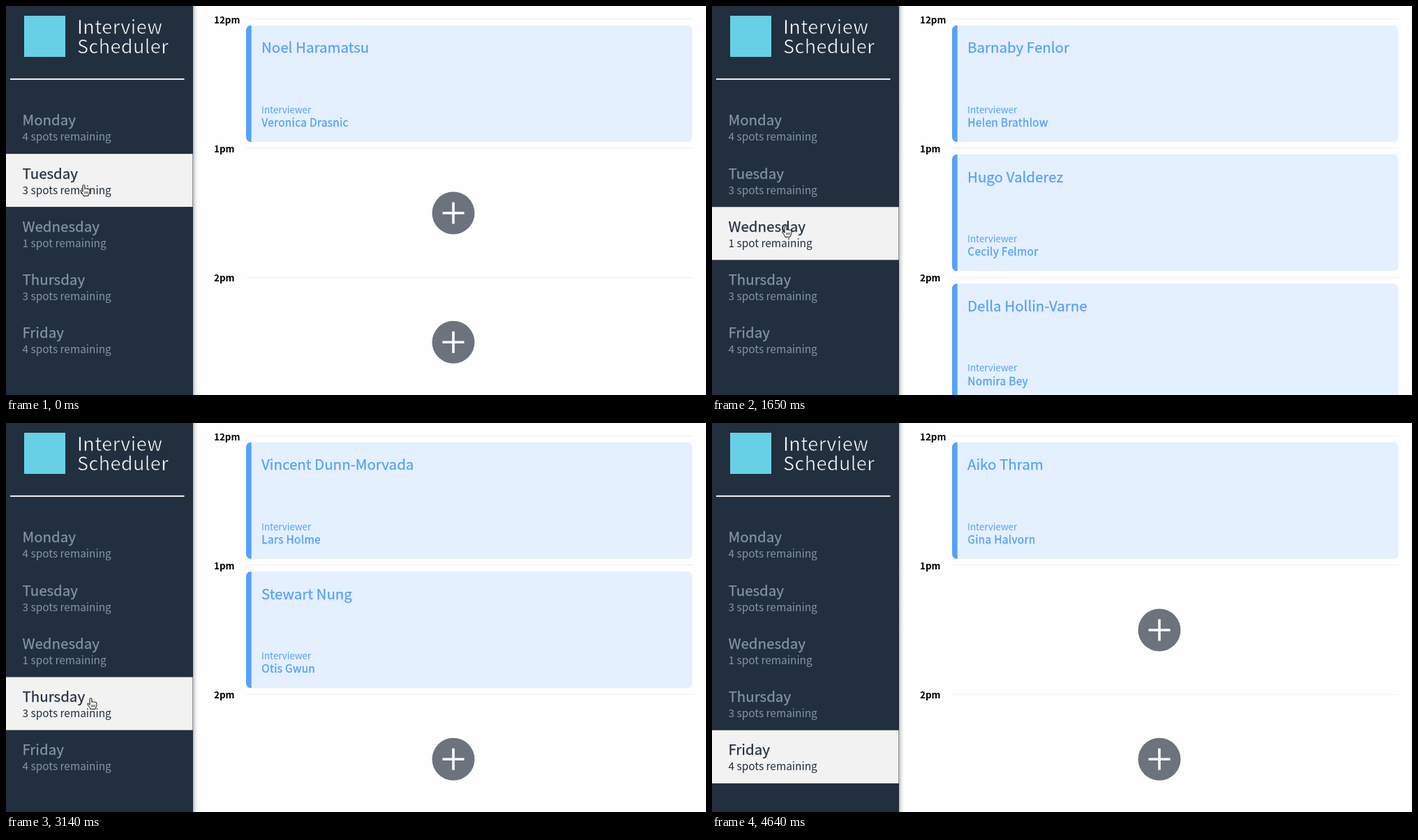
Write an HTML page that moves like this. It is 1003 by 558 pixels and loops after 5990 ms.

```html
<!DOCTYPE html>
<html lang="en">
<head>
<meta charset="utf-8">
<title>Interview Scheduler</title>
<style>
  html, body { margin: 0; width: 100%; height: 100%; overflow: hidden; background: #fefefe; }
  svg { display: block; width: 100vw; height: 100vh; }
  text { font-family: "Noto Sans CJK JP", "Noto Sans CJK SC", "Noto Sans CJK KR", "Noto Sans CJK TC", "Noto Sans", sans-serif; white-space: pre; }
  .brand { font-size: 27px; letter-spacing: .4px; fill: #fff; stroke: #222f3e; stroke-width: .6; }
  .day { font-size: 20.5px; stroke-width: .25; }
  .spots { font-size: 15.4px; }
  .hour { font-size: 13.4px; font-weight: 700; fill: #000; }
  .guest { font-size: 20.5px; fill: #54a0ff; stroke: #54a0ff; stroke-width: .25; }
  .label { font-size: 13.35px; fill: #54a0ff; }
  .host { font-size: 15.4px; letter-spacing: .33px; fill: #54a0ff; stroke: #54a0ff; stroke-width: .35; }
</style>
</head>
<body>
<svg viewBox="0 0 1003 558" preserveAspectRatio="none">
  <defs>
    <linearGradient id="shade">
      <stop offset="0" stop-color="#000" stop-opacity=".26"/>
      <stop offset=".45" stop-color="#000" stop-opacity=".09"/>
      <stop offset="1" stop-color="#000" stop-opacity="0"/>
    </linearGradient>
    <g id="hand" stroke="#000" stroke-linejoin="round" stroke-linecap="round">
      <path fill="#fff" d="M4 10V1.9C4.2.3 6.7.3 6.9 1.9V6.4C7.2 5.3 9 5.3 9.4 6.7C9.8 5.5 11.6 5.7 11.9 7.1C12.3 6.1 13.9 6.3 13.9 7.7V10.5C13.9 13 12.1 14.6 11.9 16.4H4.9C4.7 15 4.3 14.3 3.6 13.4L.9 9.7C.2 8.6 1.2 7.6 2.2 8.4Z"/>
      <path fill="none" stroke-width=".8" d="M6.9 10.4V13.2M9 10.4V13.2M11.1 10.4V13.2"/>
    </g>
    <path id="arrow" fill="#000" stroke="#fff" d="M.5.8V14L3.6 11.1L5.7 16.2L7.9 15.3L5.8 10.4H10.2Z"/>
  </defs>
  <rect width="1003" height="558" fill="#fefefe"/>
  <g id="schedule"></g>
  <rect x="268" width="7" height="558" fill="url(#shade)"/>
  <rect width="268" height="558" fill="#222f3e"/>
  <rect x="26" y="14" width="59" height="59" fill="#67d0e6"/>
  <text class="brand" x="102" y="40">Interview</text>
  <text class="brand" x="102" y="67.6">Scheduler</text>
  <rect x="6" y="103.9" width="249.5" height="1.9" fill="#fff"/>
  <g id="days"></g>
  <use id="cursor"/>
</svg>
<script>
const LOOP = 5990;
const ROW_TOP = 135.9, ROW = 76.2, SLOT = 185.25;
const DARK = '#222f3e', LIGHT = '#f2f2f2', RED = '#ee5253', GREY = '#8395a7';

const days = [
  { name: 'Monday', spots: 4 },
  { name: 'Tuesday', spots: 3, slots: [['Noel Haramatsu', 'Veronica Drasnic']] },
  { name: 'Wednesday', spots: 1, slots: [
    ['Barnaby Fenlor', 'Helen Brathlow'],
    ['Hugo Valderez', 'Cecily Felmor'],
    ['Della Hollin-Varne', 'Nomira Bey']] },
  { name: 'Thursday', spots: 3, slots: [
    ['Vincent Dunn-Morvada', 'Lars Holme'],
    ['Stewart Nung', 'Otis Gwun']] },
  { name: 'Friday', spots: 4, slots: [['Aiko Thram', 'Gina Halvorn']] }
];

// Each entry starts with the time in ms at which it takes effect.
const selected = [[0, 1], [1650, 2], [3140, 3], [4490, 4]];
const hovered = [[0, 1], [900, 2], [2690, 3], [3890, 4]];
const pointer = [
  [0, 106, 256], [600, 104, 267], [750, 102, 282], [900, 101, 296],
  [1050, 100, 305], [1350, 100, 315], [2390, 109, 335], [2540, 115, 369],
  [2690, 116, 394], [3590, 116, 396], [3740, 123, 420], [3890, 128, 453],
  [4040, 128, 472], [4490, 136, 527, 'arrow'], [4640, 0, 0, 'none']
];

const $ = id => document.getElementById(id);
const at = (keys, t) => keys.filter(k => k[0] <= t).pop();
const text = (cls, x, y, str, attrs = '') =>
  `<text class="${cls}" x="${x}" y="${y}" ${attrs}>${str}</text>`;

function card([guest, host], y) {
  return `<rect x="344" y="${y + 27.8}" width="639.3" height="167.2" rx="7" fill="#e5f0ff"/>
    <path d="M351.6 ${y + 27.8}v167.2h-.6a7 7 0 0 1-7-7v-153.2a7 7 0 0 1 7-7z" fill="#54a0ff"/>` +
    text('guest', 366, y + 67.4, guest) +
    text('label', 366, y + 153.5, 'Interviewer') +
    text('host', 366.3, y + 173.2, host);
}

function plus(y) {
  return `<circle cx="641" cy="${y + 111.8}" r="30.5" fill="#6d737d"/>
    <path d="M625.5 ${y + 111.8}h31M641 ${y + 96.3}v31" stroke="#fff" stroke-width="3.6"/>`;
}

function drawSchedule(day) {
  $('schedule').innerHTML = ['12pm', '1pm', '2pm'].map((hour, i) => {
    const y = i * SLOT, slot = days[day].slots[i];
    return `<rect x="344" y="${Math.round(y + 18)}" width="640" height="1" fill="#eee"/>` +
      text('hour', 298, y + 24.9, hour) +
      (slot ? card(slot, y) : plus(y));
  }).join('');
}

function drawDays(sel, hover) {
  $('days').innerHTML = days.map((day, i) => {
    const y = ROW_TOP + i * ROW;
    const back = i === sel ? LIGHT : i === hover ? RED : DARK;
    const ink = back === DARK ? GREY : DARK;
    const spots = `${day.spots} spot${day.spots > 1 ? 's' : ''} remaining`;
    return `<rect y="${y}" width="267.5" height="${ROW}" fill="${back}"/>` +
      text('day', 23.5, y + 35.4, day.name, `fill="${ink}" stroke="${ink}"`) +
      text('spots', 23.5, y + 57.5, spots, `fill="${ink}"`);
  }).join('');
}

let shown = '';
function render(t) {
  const sel = at(selected, t)[1], hover = at(hovered, t)[1];
  const [, x, y, shape = 'hand'] = at(pointer, t);
  const state = [sel, hover, x, y].join();
  if (state === shown) return;
  shown = state;
  drawSchedule(sel);
  drawDays(sel, hover);
  $('cursor').setAttribute('href', '#' + shape);
  $('cursor').setAttribute('transform', `translate(${x} ${y})`);
}

const start = performance.now();
function tick() {
  render((performance.now() - start) % LOOP);
  requestAnimationFrame(tick);
}
tick();
</script>
</body>
</html>
```
